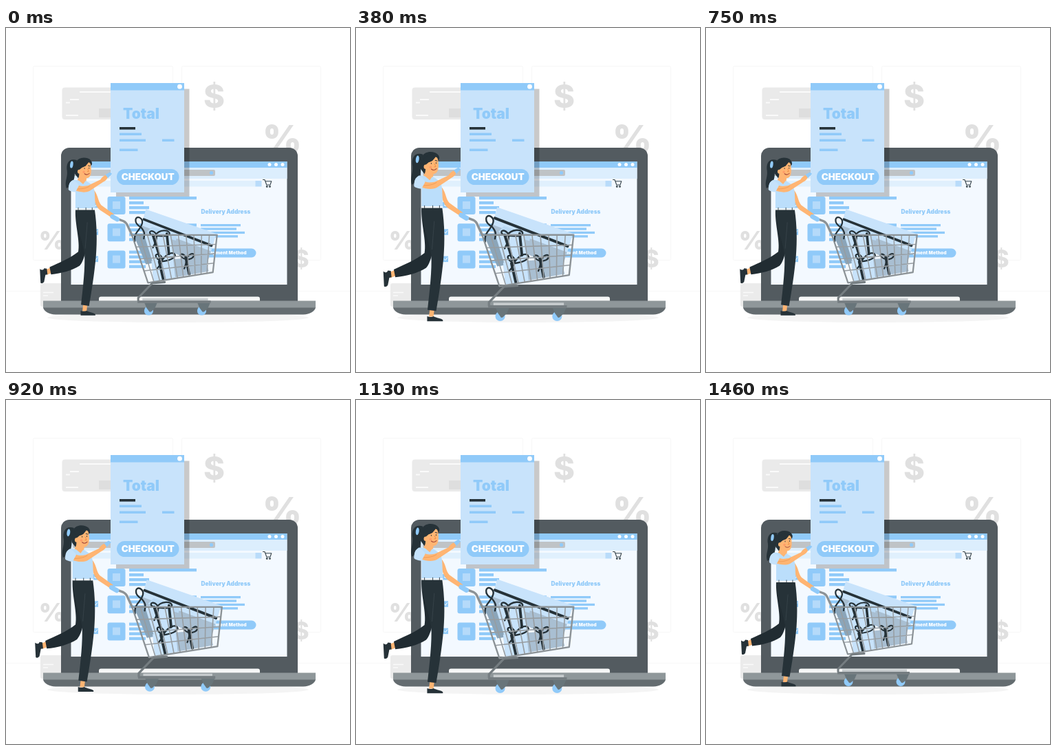
An HTML page for the animation above (1.5 s loop, 500 by 500 pixels).

```html
<!DOCTYPE html>
<html lang="en">
<head>
<meta charset="utf-8">
<title>Checkout</title>
<style>
  html, body { margin: 0; width: 100%; height: 100%; overflow: hidden; background: #fff; }
  svg { display: block; width: 100vw; height: 100vh; }
  text { font-family: Inter, "Open Sans", sans-serif; font-weight: 900; text-anchor: middle; }
  .blue { fill: #90caf9; }
  .pale { fill: #c8e3fb; }
  .grey { fill: #a9bfd2; }
  .dark { fill: #263238; }
  .skin { fill: #ffb573; }
  .line { fill: none; stroke-linecap: round; stroke-linejoin: round; }
  .ribbon { stroke: #263238; stroke-width: 3.6; }
  .bow { stroke: #263238; stroke-width: 2.2; }
  .wire { stroke: #979da1; stroke-width: 1.5; }
  .rod { stroke: #8b9296; stroke-width: 3.2; }
</style>
</head>
<body>
<svg viewBox="0 0 500 500">
  <!-- backdrop -->
  <g fill="none" stroke="#f7f7f7">
    <rect x="39.500" y="55.500" width="203" height="282" rx="2"/>
    <rect x="255.500" y="55.500" width="202" height="282" rx="2"/>
    <path d="M0 382.500H500"/>
  </g>
  <rect x="81.500" y="86.500" width="105" height="46.500" rx="4" fill="#eaeaea"/>
  <rect x="135" y="117" width="24" height="13" fill="#dedede"/>
  <path d="M93 104H106M87 108.500H93M87 127H105M107 93H152" stroke="#fafafa" stroke-width="1.800"/>
  <rect x="50" y="371" width="50" height="34" rx="3" fill="#ebebeb"/>
  <path d="M54 384.500H69M54 389H61" stroke="#fafafa" stroke-width="1.400"/>
  <g fill="#e0e0e0">
    <text x="302.500" y="115.500" font-size="47" style="font-weight:800">$</text>
    <text x="401.500" y="179.500" font-size="54">%</text>
    <text x="67" y="321.500" font-size="37">%</text>
    <text x="429" y="347.500" font-size="35" style="font-weight:800">$</text>
  </g>
  <ellipse cx="250" cy="421" rx="190" ry="7" fill="#f4f4f4"/>

  <!-- laptop -->
  <path d="M80 398V186a12 12 0 0 1 12-12H412a12 12 0 0 1 12 12V398Z" fill="#535b60"/>
  <rect x="94.500" y="194" width="314" height="179" fill="#f3f9ff"/>
  <rect x="94.500" y="203" width="314" height="16" fill="#dceefd"/>
  <rect x="94.500" y="194" width="314" height="9" class="blue"/>
  <g fill="#fff"><circle cx="383" cy="198.500" r="2.500"/><circle cx="392.500" cy="198.500" r="2.500"/><circle cx="402" cy="198.500" r="2.500"/></g>
  <rect x="97" y="206" width="207" height="9" rx="2" fill="#bfc3c6"/>
  <circle cx="298.500" cy="210.500" r="2.600" class="blue"/>
  <rect x="105" y="222" width="258" height="8.500" fill="#e0f0fd"/>
  <rect x="362.500" y="222" width="9" height="8.500" fill="#b9dcfa"/>
  <g class="line" stroke="#37444b" stroke-width="1.100">
    <path d="M373.500 220.500h2.500l2.800 7.500h5.200l1.800-5.200H377"/>
    <circle cx="379.300" cy="230.500" r=".9"/><circle cx="383.500" cy="230.500" r=".9"/>
  </g>
  <g id="shop" class="blue"></g>
  <text x="319.500" y="270.300" font-size="8.300" class="blue">Delivery Address</text>
  <rect x="283" y="320.500" width="80.500" height="13" rx="6.500" class="blue"/>
  <text x="321" y="329.300" font-size="6.700" fill="#fff">Payment Method</text>
  <path d="M54 396.500H450V407H54Z" fill="#8f979a"/>
  <path d="M54 406.500H450C449 411 442 416.500 432 416.500H72C62 416.500 55 411 54 406.500Z" fill="#646c70"/>
  <path d="M135 396.500V393.500q0-3 3-3H366q3 0 3 3V396.500Z" fill="#f6f7f7"/>

  <!-- bill -->
  <rect x="160" y="88.500" width="106.500" height="156.500" fill="#000" opacity=".21"/>
  <rect x="152" y="80" width="107" height="159" class="pale"/>
  <rect x="152" y="80" width="107" height="10.500" class="blue"/>
  <circle cx="252.500" cy="85.200" r="3.400" fill="#fff"/>
  <text x="196.500" y="132" font-size="21" class="blue">Total</text>
  <path d="M165 145.800H188" stroke="#263238" stroke-width="3.600"/>
  <path d="M165 154.300H197M165 163.300H203M227 163.300H244.500M165 177.300H191.500" stroke="#90caf9" stroke-width="3.400"/>
  <rect x="161" y="205" width="90.500" height="23" rx="11.500" class="blue"/>
  <text x="206.200" y="220.800" font-size="13.400" fill="#fff">CHECKOUT</text>

  <g id="beat">
    <!-- gifts -->
    <path d="M203 264 304 299 296 326 195.500 290Z" class="pale"/>
    <path d="M196 287 296 324 289 348 200 306Z" class="grey"/>
    <path d="M212 289 248 301 246 309 204 297Z" fill="#b9d9f4"/>
    <path d="M200 278.500 297 316" class="line ribbon"/>
    <path d="M192 300 238 298 243 333 206 343Z" class="pale"/>
    <path d="M185 300 200 299 213 341 203 343Z" fill="#8ba5b9"/>
    <path d="M213 301 224 336M233 299 236 328" class="line ribbon"/>
    <path d="M211 338 288 332 293 353 214 367Z" class="grey"/>
    <path d="M211 338 242 334 245 362 214 367Z" class="pale"/>
    <path d="M222 339 228 365M260 333 265 357" class="line ribbon"/>
    <g class="line bow">
      <path d="M196 290C184 283 188 273 194 276 201 280 198 287 190 297 187 301 186 304 187 310M196 290C201 296 202 299 200 306"/>
      <path d="M216 302C205 300 208 293 214 296 219 299 221 304 213 319M216 302C222 292 237 293 237 299 236 304 224 302 216 302"/>
      <path d="M225 339C215 333 215 327 222 329 229 333 227 340 219 349M225 339C233 326 243 324 245 330 243 336 233 338 225 339"/>
      <path d="M261 336C249 332 252 326 257 329 263 334 261 341 258 349M261 336C265 327 271 326 272 330 271 334 266 336 261 336"/>
    </g>

    <!-- cart -->
    <g id="wires" class="line wire"></g>
    <path d="M160 277 171 281Q175 283 177 288L183 301" class="line rod"/>
    <path d="M183 301H305L299 354.500 206 369.500Z" class="line" stroke="#8b9296" stroke-width="2.200"/>
    <path d="M198 393.200H292" stroke="#c6cbcd" stroke-width="3.400"/>
    <path d="M230 368.500 212 370 192 391V395" class="line" stroke="#757d81" stroke-width="3"/>
    <path d="M191 396.700H296" stroke="#757d81" stroke-width="3.600"/>
    <g id="wheels"></g>

    <!-- far arm and handle -->
    <path d="M129 237C135 245 134 252 139 258L157 271 154 276 137 265C131 260 129 250 127 244Z" class="skin"/>
    <path d="M155 274.500 162 278.500" class="line" stroke="#90caf9" stroke-width="6.500"/>

    <!-- legs -->
    <path d="M68 347 59 351 61 358 69 355Z" class="skin"/>
    <path d="M61 349 57 348.500C56 352 53 351 51 349.500L52 369.500Q55 371 57 368L59 358 62 357.500Z" class="dark"/>
    <path d="M102 265C101 285 109 310 106 325 95 334 78 341 65 347L67 357.500C82 356 97 352 108 345 116 337 120 310 122 288Z" fill="#212c32"/>
    <path d="M113 401 112 410H118L119 401Z" class="skin"/>
    <path d="M109.500 409.500C113 411 116 410.500 118 409.500 122 412 128 412 130.500 414.500V416.200H109.500Z" class="dark"/>
    <path d="M102 264H129.500C133 288 133 310 131.500 330 129 358 125 382 121.500 402.500L110 401C113 375 116 348 115 328 111 305 104 292 102 264Z" class="dark"/>
    <path d="M119 283 116 320" class="line" stroke="#3c484e" stroke-width=".7"/>

    <!-- head -->
    <path d="M104 193.500C93 190 88 198 90 209 91 219 86 224 89 234 98 230 101 222 101 211Z" class="dark"/>
    <path d="M101 213C99 198 104 190 114 190 122 190 127 195 125.500 200L118 210 107 221Z" class="dark"/>
    <path d="M108 207 120 197C123 196 124.500 200 124.500 206 125 213 123.500 219 118 219.500L117 226 109 229 104 224 107 217Z" class="skin"/>
    <path d="M104 200C109 207 117 204 121 196L113 193Z" class="dark"/>
    <ellipse cx="107.500" cy="210" rx="2.500" ry="3" class="skin"/>
    <ellipse cx="96.500" cy="200" rx="2.200" ry="5" transform="rotate(8 96.500 200)" class="blue"/>
    <g class="line" stroke="#263238" stroke-width=".9">
      <path d="M115 205v1M121.500 204.500v1M113.500 202.300l3-.8M120.300 201.500l2.500.6"/>
    </g>
    <path d="M115 213Q118.500 216 122 212.500" class="line" stroke="#a5483a"/>
    <path d="M119.500 206 121 210H119" class="line" stroke="#ed893e" stroke-width=".8"/>
    <circle cx="114" cy="210.500" r="1.700" fill="#ff9c68"/>

    <!-- shirt and near arm -->
    <path d="M98 222C104 221 108 224 116 223 124 226 129 231 129.500 240L130.500 263H102L102 239 92.500 236C92 229 94 225 98 222Z" fill="#bbdefb"/>
    <path d="M106 222 113 228 117 222.500" class="skin"/>
    <path d="M102 262.700H130.500V265H102Z" fill="#f4f8fb"/>
    <path d="M106 261.500v4M117 261.500v4M126 261.500v4" stroke="#263238" stroke-width=".8"/>
    <path d="M104 228C109 232 114 231 120 230L138 221.500C140 218 142 216 147 214.500L149 217C147 222 144 224 140 226L122 238C115 241 107 239 101 237Z" class="skin"/>
    <path d="M104 235C112 235 117 234 122 231" class="line" stroke="#ed9852" stroke-width=".8"/>
    <path d="M97 223C103 223 106 228 107 230L102 239.500C97 239 93 237.500 92 236 92 230 93 225 97 223Z" fill="#c5e2fb"/>
    <path d="M145 214.500 151 211 154.500 213 148.500 219.500Z" class="blue"/>
  </g>
</svg>
<script>
const $ = id => document.getElementById(id);
const bar = (x, y, w, h = 4.3) => `<rect x="${x}" y="${y}" width="${w}" height="${h}"/>`;

// Product rows
let shop = "";
for (let i = 0; i < 3; i++) {
  const y = 245 + i * 39.3;
  shop += `<rect x="147.500" y="${y}" width="26" height="26" rx="3"/>` +
    `<rect x="155" y="${y + 7}" width="11" height="11" fill="#b5dafa"/>` +
    bar(126, y + 8, 8, 8.5) +
    `<path d="M128 ${y + 12}l2 2 3-4" fill="none" stroke="#fff"/>` +
    [98, 21, 29, 24].map((w, n) => bar(179, y + n * 7, w)).join("");
}
[58, 52, 64, 54].forEach((w, i) => shop += bar(283, 285 + i * 5.4, w, 3.3));
$("shop").innerHTML = shop;

// Basket mesh between the slanted sides
const mix = (a, b, f) => a + (b - a) * f;
let mesh = "";
for (let i = 1; i < 11; i++) {
  const f = i / 11;
  mesh += `M${mix(183, 305, f)} 301L${mix(206, 299, f)} ${mix(369.5, 354.5, f)}`;
}
for (let i = 1; i < 4; i++) {
  const f = i / 4;
  mesh += `M${mix(183, 206, f)} ${mix(301, 369.5, f)}L${mix(305, 299, f)} ${mix(301, 354.5, f)}`;
}
$("wires").innerHTML = `<path d="${mesh}"/>`;

$("wheels").innerHTML = [207, 283].map(x =>
  `<circle cx="${x}" cy="409.500" r="6.500" class="blue"/>` +
  `<path d="M${x - 6} 398.500h18l-3 7-5 5q-3 2-4-1l-3-4Z" fill="#68757a"/>`).join("");

// Double heartbeat: [progress, scale], two beats per loop
const beat = [[0, 1], [.32, 1.08], [.4, 1.05], [.6, 1.1], [1, 1]];
const LOOP = 1500, STEPS = 36;

function scaleAt(p) {
  const i = beat.findIndex(k => k[0] > p);
  const [p0, s0] = beat[i - 1], [p1, s1] = beat[i];
  return mix(s0, s1, (p - p0) / (p1 - p0));
}

function draw(now) {
  const step = Math.floor((now % LOOP + 5) * STEPS / LOOP);
  const s = scaleAt((step + 1) % 18 / 18);
  $("beat").setAttribute("transform", `translate(178 303) scale(${s}) translate(-178 -303)`);
}

function tick() {
  draw(performance.now());
  requestAnimationFrame(tick);
}
tick();
</script>
</body>
</html>
```
